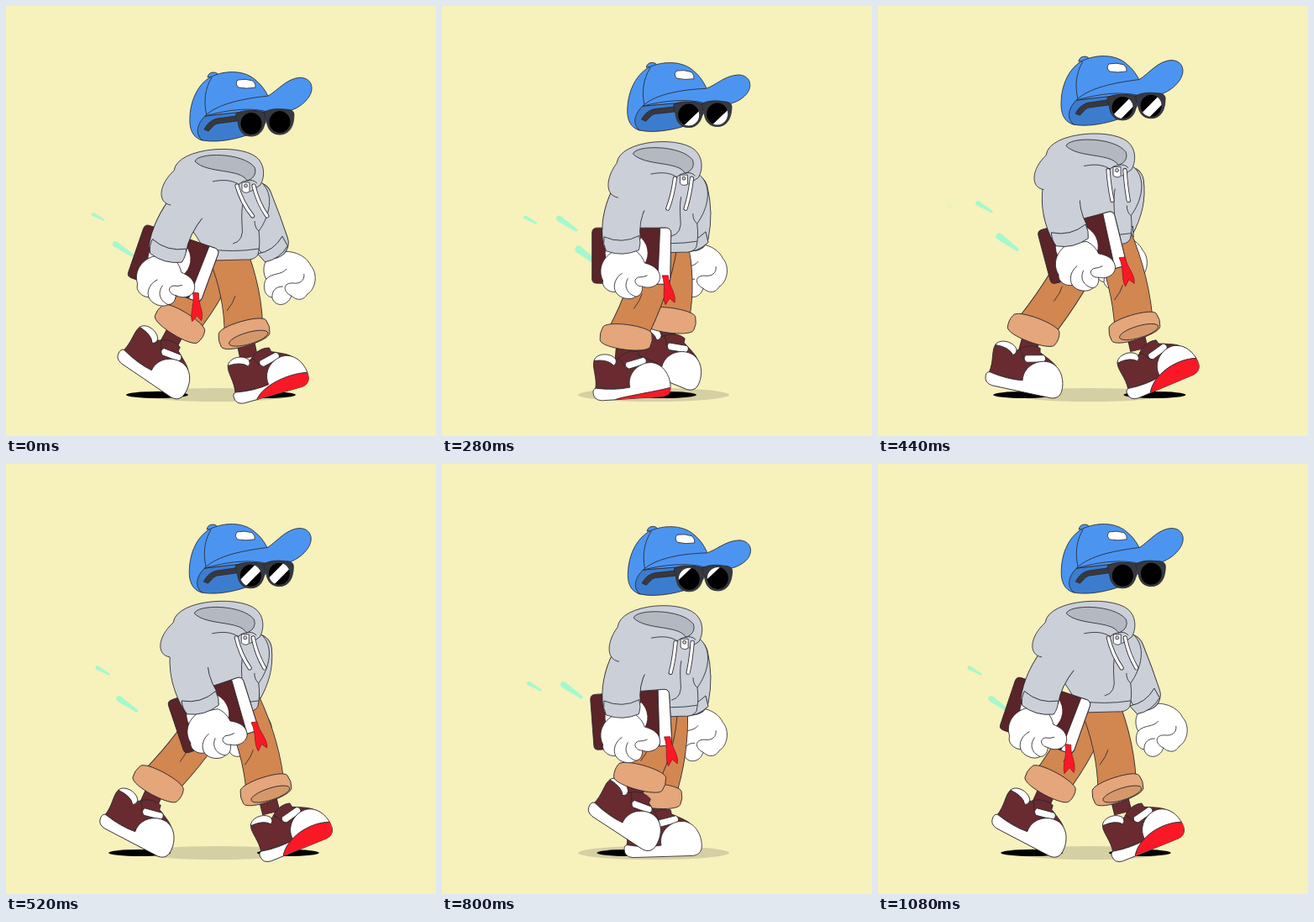
Write an HTML page with a canvas that moves like this. It is 512 px wide and 512 px high and loops after 1.12 s.

```html
<!DOCTYPE html>
<html lang="en">
<head>
<meta charset="utf-8">
<title>Walk cycle</title>
<style>
  html, body { margin: 0; width: 100%; height: 100%; overflow: hidden; background: #f7f1bc; }
  canvas { display: block; width: 100vw; height: 100vh; }
</style>
</head>
<body>
<canvas id="stage" width="512" height="512"></canvas>
<script>
const ctx = document.getElementById('stage').getContext('2d');
const LOOP = 1120, STEP = LOOP / 2, TICK = 40;
const INK = '#2b2930', WHITE = '#ffffff', BLUE = '#4b95f1', DEEP_BLUE = '#3c7ccf',
  GREY = '#cacfd8', DARK_GREY = '#b3b8c1', SHOE = '#692b2f', BOOK = '#5a2428', RED = '#fb1826',
  PANTS = '#d28650', CUFF = '#e4a67a', FRAME = '#36393e', MINT = '#a5f8cd';
const { sin, cos, min, max, sqrt, PI } = Math;

const wave = (t, period, peak) => cos(2 * PI * (t - peak) / period);

function shape(d, fill, line = INK, width = .85) {
  const p = new Path2D(d);
  if (fill) { ctx.fillStyle = fill; ctx.fill(p); }
  if (line) { ctx.strokeStyle = line; ctx.lineWidth = width; ctx.stroke(p); }
}

function oval(x, y, rx, ry, fill, line) {
  ctx.beginPath();
  ctx.ellipse(x, y, rx, ry, 0, 0, 7);
  ctx.fillStyle = fill;
  ctx.fill();
  if (line) { ctx.strokeStyle = line; ctx.lineWidth = .85; ctx.stroke(); }
}

function at(x, y, deg, draw) {
  ctx.save();
  ctx.translate(x, y);
  ctx.rotate(deg * PI / 180);
  draw();
  ctx.restore();
}

function tube(d, width, fill, cap = 'butt') {
  ctx.lineCap = cap;
  shape(d, null, INK, width + 1.7);
  shape(d, null, fill, width);
  ctx.lineCap = 'butt';
}

// Foot and trouser cuff at a phase of the walk; phase 0 is the heel strike.
function legPose(p, shift) {
  return {
    x: shift + 235 + 76 * cos(p) - 10 * sin(p) - 8 * sin(2 * p),
    y: min(440, 430 + 14 * cos(p - 1.08)),
    tilt: 10 - 25 * cos(p) - 9 * sin(p) + 15 * sin(2 * p) + 4 * sin(3 * p),
    cuffX: shift + 233 + 50 * cos(p) - 14 * sin(p),
    cuffY: 384 + 6 * cos(p) + 10 * sin(p),
    cuffTilt: 8 - 24 * cos(p) + 6 * sin(2 * p)
  };
}

function drawStreak(age, life, x, y, rise, bob) {
  const u = age / life;
  if (u <= 0 || u >= 1) return;
  const size = sqrt(1 - u), l = 18 * size, h = 4.5 * size;
  at(x - 92 * u, y - rise(u) + bob, 20 + 18 * size, () => shape(
    `M${l} ${-h * .5} L${h - l} ${-h} C${-l - h * .4} ${-h} ${-l - h * .4} ${h} ${h - l} ${h} L${l} ${h * .5} Q${l + h * .5} 0 ${l} ${-h * .5}Z`,
    MINT, null));
}

function drawStreaks(t, bob) {
  for (const now of [t % STEP, t % STEP + STEP]) {
    drawStreak(now - 40, 660, 182, 297, u => 53 * u ** .6, bob);
    drawStreak(now - 260, 750, 176, 307, u => 50 * u * u * (3 - 2 * u), bob);
  }
}

function drawShoe({ x, y, tilt }) {
  at(x, y, tilt, () => {
    shape('M-43 14 C-40 0 -46 -12 -43 -20 C-38 -27 -30 -24 -23 -20 Q-16 -17 -11 -24 Q0 -31 10 -28 L11 -23 C22 -18 32 -14 34 -10 L0 15Z', SHOE);
    shape('M-43 -20 C-40 -29 -22 -29 -17 -20 Q-16 -15 -20 -13 Q-26 -21 -43 -20Z', WHITE);
    shape('M-14 -22 Q-8 -17 -7 -11', null);
    shape('M-5 -16 L16 -21 Q21 -18 18 -13 L-2 -8 Q-8 -11 -5 -16Z', WHITE);
    shape('M-2 14 C-5 -4 12 -16 26 -14 C42 -11 48 8 46 19 Q44 26 36 27 L-36 28 Q-46 27 -46 18 Q-46 13 -42 13 Q-20 17 -2 14Z', WHITE);
    const k = min(1, max(0, -tilt / 20));
    if (k > .05) {
      const edge = `M-20 27.5 C-10 ${27 - 17 * k} 22 ${25 - 24 * k} 46 ${18 - 8 * k}`;
      shape(edge + ' Q48 26 36 27Z', RED, null);
      shape(edge, null);
    }
  });
}

function drawLeg(leg, hipX, hipY) {
  const { x, y, cuffX, cuffY, cuffTilt } = leg;
  tube(`M${cuffX} ${cuffY} L${cuffX * .6 + x * .4 - 5} ${y - 18}`, 20, SHOE);
  drawShoe(leg);
  const kneeX = (hipX + cuffX) / 2 + 10, kneeY = (hipY + cuffY) / 2;
  tube(`M${hipX} ${hipY} Q${kneeX} ${kneeY} ${cuffX} ${cuffY}`, 45, PANTS);
  shape(`M${kneeX - 20} ${kneeY + 22} Q${kneeX - 12} ${kneeY + 12} ${kneeX - 10} ${kneeY + 4}`, null);
  at(cuffX, cuffY, cuffTilt, () => {
    shape('M-29 -7 C-28 -17 27 -17 30 -8 Q33 0 30 8 C27 17 -27 18 -30 8 Q-32 0 -29 -7Z', CUFF);
    if (cuffTilt < -6) oval(4, 7, 24, 7, '#d6986b', INK);
  });
}

function drawFarArm(s, bob) {
  at(312 - 26 * s, 325 + bob, 0, () => {
    shape('M-22 -28 C-5 -38 18 -31 25 -16 C34 -6 31 12 21 18 C15 28 6 24 2 20 C-2 33 -18 34 -21 22 C-32 20 -32 6 -28 0 C-34 -10 -30 -24 -22 -28Z', WHITE);
    shape('M-28 0 C-20 -8 -10 -4 -4 -12 M2 20 C-9 15 -8 4 4 5 M-21 22 C-21 13 -16 9 -8 9 M4 5 C12 6 18 2 17 -6', null);
  });
  const x = 301 - 17 * s, y = 290 + bob;
  tube(`M298 ${228 + bob} Q${305 - 4 * s} ${255 + bob} ${x} ${y - 8}`, 36, GREY, 'round');
  at(x, y, -20 + 14 * s, () => shape('M-18 -6 Q0 2 18 -7 L17 6 Q0 14 -16 7Z', GREY));
}

function drawTrunk(bob, q) {
  ctx.save();
  ctx.translate(q * .2, bob);
  shape('M202 224 C220 190 285 190 304 210 C320 224 314 250 301 268 Q303 284 300 296 Q296 303 284 302 L246 303 Q235 300 236 290 C226 270 206 250 202 224Z', GREY);
  shape('M237 289 Q270 294 301 289 M270 283 Q284 280 281 260 Q280 245 282 236 M301 268 Q296 264 296 256', null);
  ctx.restore();
}

function drawBook(s, bob, angle) {
  at(223 + 24 * s, 306 + bob, angle, () => {
    shape('M-41 -33 L40 -33 Q47 -33 47 -27 L46 28 Q46 35 40 34 L-41 33 Q-47 33 -47 28 L-47 -27 Q-47 -33 -41 -33Z', BOOK);
    shape('M34 -33 L42 -33 Q47 -32 47 -27 L46 28 Q45 34 40 34 L31 34Z', WHITE);
    oval(-6, -3, 25, 25, WHITE);
    at(43, 41, -8 - angle * .6, () =>
      shape('M-4 -18 L3 -17 C2 -4 10 6 6 16 L1 10 L-5 17 C-8 6 -1 -4 -4 -18Z', RED, '#9c1a22'));
  });
}

function drawNearArm(s, bob, q) {
  at(221 + 31 * s, 329 + bob, -7 * s, () => {
    shape('M-18 -29 C-34 -22 -39 -6 -33 6 C-35 14 -26 21 -18 20 C-14 28 0 31 6 26 C13 25 14 18 14 14 C24 18 36 12 35 2 C34 -8 24 -12 17 -14 C14 -23 8 -28 4 -30Z', WHITE);
    shape('M-18 20 C-22 12 -17 2 -10 -2 M6 26 C-6 22 -8 12 -3 4 M14 14 C6 14 2 6 9 3 Q16 3 20 1', null);
  });
  const sx = 218 + q * .4, sy = 236 + bob, wx = 212 + 20 * s, wy = 290 + bob;
  tube(`M${sx} ${sy} Q${(sx + wx) / 2 - 9} ${(sy + wy) / 2} ${wx} ${wy}`, 44, GREY);
  oval(sx + 8, sy - 8, 26, 26, GREY);
  at(wx, wy + 2, -16 * s, () => shape('M-21 -9 Q0 1 21 -9 Q23 0 20 8 Q0 16 -19 8 Q-23 0 -21 -9Z', GREY));
}

function drawHood(bob, q, swing, dx) {
  ctx.save();
  ctx.translate(dx, bob);
  const l = q - dx, m = l / 2;
  const back = `M${196 + l} 237 C${179 + l} 234 ${182 + l} 212 ${200 + m} 196 C${203 + m} 167 288 162 302 184 C308 192 308 204 303 213`;
  shape(`${back} L290 222 L278 212 C262 204 244 208 230 216 C218 224 ${208 + l} 238 ${196 + l} 237Z`, GREY, null);
  shape(`${back} L291 221 M278 213 C268 206 256 207 246 209`, null);
  shape('M225 185 C228 174 282 174 296 192 C299 200 294 206 287 208 C279 193 240 200 225 185Z', DARK_GREY);
  shape('M276 213 Q282 208 287 208 Q294 206 299 211', null);
  shape('M281 210 L290 210 L290 221 Q285 224 281 220Z', WHITE);
  oval(285.5, 214, 2, 2, GREY, INK);
  for (const [x, reach] of [[275, 1], [295, .85]])
    tube(`M${x} 214 Q${x + swing * reach * .3} 234 ${x + swing * reach} 250`, 3.4, WHITE, 'round');
  ctx.restore();
}

function drawLens(x, y, glint) {
  ctx.save();
  ctx.translate(x, y);
  shape('M-17 -12 Q-8 -17 8 -15 Q18 -15 18 -9 C18 6 12 15 1 15 C-10 15 -14 7 -15 -3 Q-18 -6 -17 -12Z', FRAME);
  oval(1, 0, 12.5, 13, '#000');
  ctx.clip();
  ctx.rotate(PI / 4);
  ctx.fillStyle = WHITE;
  ctx.fillRect(glint - 5, -22, 10, 44);
  ctx.restore();
}

function drawHead(t, dx) {
  const sway = wave(t, STEP, 200), e = 3 + 4.5 * sway;   // e bends the brim
  at(262 + dx, 109.4 + 16 * wave(t, STEP, 108), .8 + 1.2 * sway, () => {
    ctx.translate(-262, -115);
    shape('M237 131 C224 140 222 156 234 160 C255 164 286 156 300 148 C310 141 314 132 312 122Z', DEEP_BLUE);
    shape('M240 85 Q241 79 247 79 Q252 79 253 83Z', BLUE);
    shape('M234 160 C222 157 218 146 219 132 C220 108 232 89 247 83 C264 76 285 77 297 88 Q306 95 312 107 L300 124 L237 131 C227 141 225 153 234 160Z', BLUE);
    shape('M245 85 C237 98 235 114 239 130', null);
    shape(`M237 131 C252 116 284 110 312 ${107 + e * .2} C324 ${100 + e * .6} 334 ${86 + e} 350 ${85 + e} C364 ${85 + e} 368 ${98 + e} 360 ${109 + e * .8} C350 ${123 + e * .5} 330 130 312 126 C290 120 262 124 237 131Z`, BLUE);
    shape('M276 88 Q285 86 294 89 Q298 93 297 97 Q286 99 277 97 Q272 93 276 88Z', WHITE);
    shape('M236 147 C240 139 246 135 252 134 L280 130 L282 136 L252 140 C247 141 245 146 241 149Z', FRAME);
    shape('M302 128 Q309 124 316 127 L314 134 Q309 130 304 135Z', FRAME);
    const glint = 11 - 23 * (t - 280) / 520;
    drawLens(291, 140, glint);
    drawLens(325, 138, glint);
  });
}

function draw(t) {
  ctx.fillStyle = '#f7f1bc';
  ctx.fillRect(0, 0, 512, 512);
  ctx.lineJoin = 'round';

  const phase = 2 * PI * t / LOOP;
  const bob = 16 * wave(t, STEP, 115) - 4.4;
  const s = -wave(t, LOOP, -20);            // arm swing, -1 back to +1 front
  const q = 7 + 8 * wave(t, STEP, 230);     // back of the hood
  const dx = 1.2 + 2.3 * wave(t, STEP, 190);
  const strings = 5 + 14 * wave(t, STEP, 20);
  const near = legPose(phase, 0), far = legPose(phase + PI, 24);

  drawStreaks(t, bob);
  oval(252, 463, 90, 8, '#d5cfa4');
  for (const foot of [far, near]) oval(foot.x - 3, 463, 37, 4, '#000');

  drawFarArm(s, bob);
  drawLeg(far, 268 + 12 * s, 292 + bob);
  drawLeg(near, 258 - 5 * s, 292 + bob);
  drawTrunk(bob, q);
  drawBook(s, bob, 19 * cos(phase));
  drawNearArm(s, bob, q);
  drawHood(bob, q, strings, dx);
  drawHead(t, dx);
}

const start = performance.now();
function frame() {
  const t = max(0, performance.now() - start) % LOOP;
  draw(Math.floor(t / TICK) * TICK);
  requestAnimationFrame(frame);
}
frame();
</script>
</body>
</html>
```
